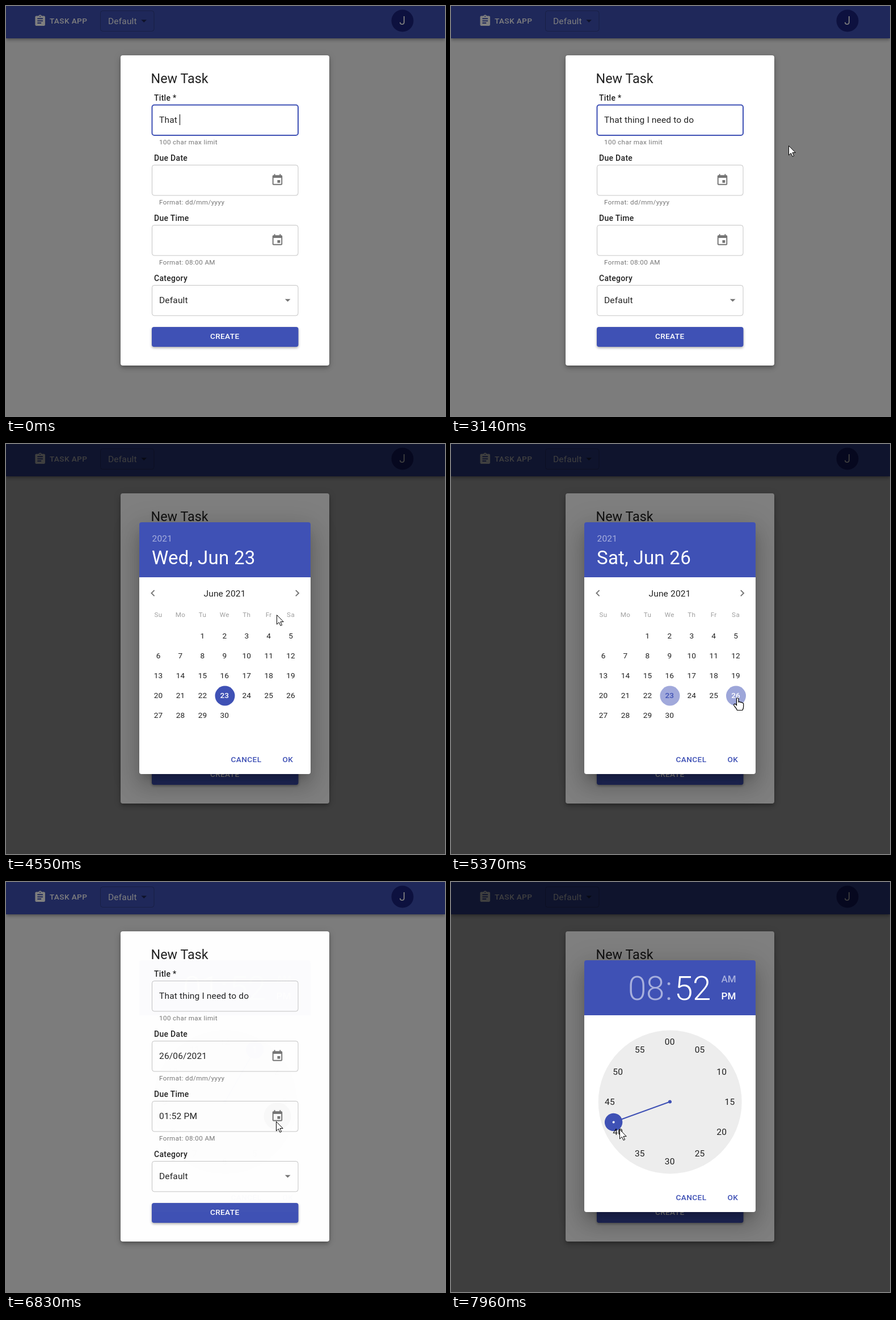
Animation of 774 by 723 pixels, one loop 8000 ms. Source, as an HTML page:

```html
<!DOCTYPE html>
<html lang="en">
<head>
<meta charset="utf-8">
<title>New Task</title>
<style>
html, body { margin: 0; width: 100%; height: 100%; overflow: hidden; background: #fafafa; }
#stage { position: relative; width: 774px; height: 723px; overflow: hidden; }
#stage div, svg { position: absolute; }
svg, .shade, #picker { left: 0; top: 0; width: 774px; height: 723px; }
text { font-family: Roboto, sans-serif; white-space: pre; fill: #000; fill-opacity: .87; }
.bar { left: 0; top: 0; width: 774px; height: 57px; background: #3f51b5;
  box-shadow: 0 2px 4px -1px #0003, 0 4px 5px #00000024, 0 1px 10px #0000001f; }
.shade { background: #000; opacity: .5; }
.paper { left: 202px; top: 87px; width: 368px; height: 546.5px; border-radius: 4px; background: #fff;
  box-shadow: 0 3px 5px -1px #0003, 0 5px 8px #00000024, 0 1px 14px #0000001f; }
.card { left: 235px; top: 138px; width: 302px; height: 444px; border-radius: 4px;
  background: linear-gradient(#3f51b5 97px, #fff 0);
  box-shadow: 0 11px 15px -7px #0003, 0 24px 38px 3px #00000024, 0 9px 46px 8px #0000001f; }
.white { fill: #fff; fill-opacity: 1; }
.faded { fill: #fff; fill-opacity: .54; }
.blue { fill: #3f51b5; fill-opacity: 1; }
.soft { fill-opacity: .54; }
.pale { fill-opacity: .38; }
.mid { text-anchor: middle; }
.medium { font-weight: 500; }
.light { font-weight: 300; }
.field { fill: none; stroke: #000; stroke-opacity: .23; }
.field.hover { stroke-opacity: .87; }
.field.focus { stroke: #3f51b5; stroke-opacity: 1; stroke-width: 2; }
</style>
</head>
<body>
<div id="stage">
  <div class="bar"></div>
  <svg id="page"></svg>
  <div class="shade"></div>
  <div class="paper"></div>
  <svg id="form"></svg>
  <div class="shade" id="dim"></div>
  <div id="picker">
    <div class="card"></div>
    <svg id="calendar"></svg>
    <svg id="clock"></svg>
    <svg id="actions"></svg>
  </div>
  <svg id="pointer">
    <path id="arrow" fill="#fff" stroke="#000" d="M0 0V16.5l3.9-3.6 2.6 6 2.6-1.1-2.6-5.8h5.2z"/>
    <path id="hand" fill="#fff" stroke="#000" stroke-width="1.2"
      d="M-1.5 1Q.3-1.5 2 1V7q2-1 3.4.5 2-.6 3 1 2.3-.2 2.3 2V15q0 3.5-2 6.500H-.5q-1-3-4.700-7-2.300-3 0-4 1.700-.4 3.700 2z"/>
  </svg>
</div>
<script>
const $ = id => document.getElementById(id);
const K = 0.973; // page zoom
const text = (x, y, str, size, cls = '', ls = .15, id = '') =>
  `<text id="${id}" x="${x}" y="${y}" class="${cls}" style="font-size:${size * K}px;letter-spacing:${ls * K}px">${str}</text>`;
const icon = (x, y, d, cls = 'soft') =>
  `<path class="${cls}" transform="translate(${x} ${y}) scale(${K})" d="${d}"/>`;
const field = (y, id) => `<rect class="field" id="${id}" x="257.5" y="${y}.5" width="257.5" height="53.5" rx="4"/>`;
const circle = (x, y, r, rest) => `<circle cx="${x}" cy="${y}" r="${r}" ${rest}/>`;

const ARROW = 'M7 10l5 5 5-5z';
const EVENT = 'M17 12h-5v5h5v-5zM16 1v2H8V1H6v2H5c-1.100 0-2 .9-2 2v14c0 1.100.9 2 2 2h14c1.100 0 2-.9 2-2V5c0-1.100-.9-2-2-2h-1V1h-2zm3 18H5V8h14v11z';
const CLIPBOARD = 'M19 3h-4.180C14.400 1.840 13.300 1 12 1s-2.400.84-2.820 2H5c-1.100 0-2 .9-2 2v14c0 1.100.9 2 2 2h14c1.100 0 2-.9 2-2V5c0-1.100-.9-2-2-2zm-7 0c.55 0 1 .45 1 1s-.45 1-1 1-1-.45-1-1 .45-1 1-1zm2 14H7v-2h7v2zm3-4H7v-2h10v2zm0-4H7V7h10v2z';

$('page').innerHTML =
  icon(48.5, 14.5, CLIPBOARD, 'white') +
  text(77, 30.5, 'TASK APP', 14, 'white medium', .4) +
  '<rect class="field" x="166.500" y="8.500" width="94.500" height="36" rx="4"/>' +
  text(180, 32, 'Default', 16, 'white') +
  icon(231.5, 14.5, ARROW) +
  circle(699, 26, 19.5, 'fill="#1a237e"') +
  text(699, 33, 'J', 20, 'white mid');

const label = (y, str) => text(261, y, str, 14.4, 'medium', .3);
const hint = (y, str) => text(270, y, str, 12, 'soft', .4);
$('form').innerHTML =
  text(255.5, 136, 'New Task', 24, '', 0) +
  label(167, 'Title *') + field(174, 'titleBox') + text(270, 206, '', 16, '', .15, 'title') +
  '<rect id="caret" y="191" width="1" height="19"/>' + hint(244, '100 char max limit') +
  label(273, 'Due Date') + field(280, 'dateBox') + text(270, 312, '', 16, '', .15, 'date') +
  hint(350, 'Format: dd/mm/yyyy') +
  label(379, 'Due Time') + field(386, 'timeBox') + text(270, 418, '', 16, '', .15, 'time') +
  hint(456, 'Format: 08:00 AM') +
  circle(478.5, 307, 24, 'id="dateRipple"') + circle(478.5, 413, 24, 'id="timeRipple"') +
  icon(466.8, 295.3, EVENT) + icon(466.8, 401.3, EVENT) +
  label(485, 'Category') + field(492, 'categoryBox') + text(270, 524, 'Default', 16) +
  icon(485, 507, ARROW) +
  '<rect class="blue" x="257" y="566" width="258.500" height="35" rx="4" style="filter:drop-shadow(0 2px 2px #0005)"/>' +
  text(385.7, 587, 'CREATE', 14, 'white medium mid', .4);

// Calendar: June 2021 starts on a Tuesday
const colX = i => 268.6 + 38.92 * i;
const days = Array.from({ length: 30 }, (_, i) => {
  const n = i + 2;
  return text(colX(n % 7), 343.3 + 35 * Math.floor(n / 7), i + 1, 14, 'mid', .15, 'day' + (i + 1));
});
$('calendar').innerHTML =
  text(257.5, 172, '2021', 16, 'faded') +
  text(257, 212, '', 34, 'white', .25, 'heading') +
  icon(247.3, 251.3, 'M15.410 16.590L10.830 12l4.580-4.590L14 6l-6 6 6 6z') +
  icon(501.8, 251.3, 'M8.590 16.590L13.170 12 8.590 7.410 10 6l6 6-6 6z') +
  text(385.5, 268.5, 'June 2021', 16, 'mid') +
  'Su Mo Tu We Th Fr Sa'.split(' ').map((d, i) => text(colX(i), 305, d, 12, 'mid pale', .4)).join('') +
  circle(386, 444, 17.5, 'class="blue" id="dot23"') +
  circle(502.5, 444, 17.5, 'class="blue" id="dot26"') + days.join('');

const CX = 386, CY = 387.5, R = 105.7;
const numbers = Array.from({ length: 12 }, (_, i) => {
  const a = i * Math.PI / 6;
  return text(CX - .3 + R * Math.sin(a), CY + 5.2 - R * Math.cos(a), '', 16, 'mid', .15, 'num' + i);
});
$('clock').innerHTML =
  text(344, 208, '', 60, 'mid light', -.5, 'hour') +
  text(384, 208, ':', 60, 'faded mid light', -.5) +
  text(426, 208, '52', 60, 'mid light', -.5, 'minute') +
  text(476.5, 177, 'AM', 17.5, 'faded medium', 0) +
  text(476.5, 207, 'PM', 17.5, 'white medium', 0) +
  circle(386.2, 388, 126.5, 'fill="#ededed"') +
  `<g id="clockHand" class="blue">
    <path d="M${CX} ${CY}v${-R}" stroke="#3f51b5" stroke-width="2"/>` +
  circle(CX, CY - R, 15.7, '') + circle(CX, CY, 3, '') + circle(CX, CY - R, 2, 'id="thumb" fill="#fff"') +
  '</g>' + numbers.join('');

$('actions').innerHTML =
  circle(498, 554, 18, 'class="blue" id="okRipple"') +
  text(396.5, 561, 'CANCEL', 14, 'blue medium', .4) +
  text(487.5, 561, 'OK', 14, 'blue medium', .4);

const clamp = v => Math.max(0, Math.min(1, v));
const between = (t, a, b) => t >= a && t < b;
const show = (id, o) => $(id).style.opacity = +o;
const write = (id, str) => { if ($(id).textContent !== str) $(id).textContent = str; };

// cubic-bezier(.4, 0, .2, 1)
function ease(x) {
  x = clamp(x);
  let lo = 0, hi = 1, s;
  for (let i = 0; i < 20; i++) {
    s = (lo + hi) / 2;
    if (1.2 * s * (1 - s) ** 2 + .6 * s * s * (1 - s) + s ** 3 < x) lo = s; else hi = s;
  }
  return 3 * s * s * (1 - s) + s ** 3;
}
const ripple = (t, start, peak) => peak * clamp((t - start) / 200) * (1 - clamp((t - start - 250) / 400));

// Keystrokes come in bursts: first time, last time, count
const keys = [[100, 170, 2], [330, 950, 8], [1330, 1330, 1], [1560, 1900, 5], [2100, 2400, 4]]
  .flatMap(([a, b, n]) => Array.from({ length: n }, (_, i) => a + (b - a) * i / Math.max(1, n - 1)));
const TITLE = 'That thing I need to do ';

const path = [
  [3140, 595.5, 246.5], [3750, 480, 303], [3900, 477.5, 301.5], [4780, 477.5, 301.5],
  [5210, 505, 448], [5390, 505, 448], [5600, 501, 541], [5750, 497, 548], [6046, 497, 548],
  [6130, 492, 528], [6400, 492, 433], [6610, 476.5, 420], [6770, 476.5, 420],
  [6810, 476.5, 422.5], [7050, 476.5, 422.5], [7780, 297.5, 436.5], [8000, 297.5, 436.5]
];
function pointerAt(t) {
  const i = Math.max(1, path.findIndex(p => p[0] > t));
  const [a, b] = [path[i - 1], path[i]];
  const u = clamp((t - a[0]) / (b[0] - a[0])), s = u * u * (3 - 2 * u);
  return [a[1] + (b[1] - a[1]) * s, a[2] + (b[2] - a[2]) * s];
}

const BLUR = 3850, PICK = 5318, ACCEPT = 6046, HOUR = 7830, MINUTES = 7900;

function draw(t) {
  // Form
  const n = keys.filter(k => k <= t).length;
  write('title', TITLE.slice(0, n === keys.length ? -1 : 5 + n));
  $('caret').setAttribute('x', Math.round(270 + $('title').getComputedTextLength()));
  show('caret', t < 2810 || between(t, 3340, BLUR));
  $('titleBox').classList.toggle('focus', t < BLUR);
  $('dateBox').classList.toggle('hover', between(t, 3530, 4242));
  write('date', t < ACCEPT ? '' : '26/06/2021');
  write('time', t < ACCEPT ? '' : '01:52 PM');
  show('dateRipple', ripple(t, BLUR, .1) + .04 * between(t, 3640, 4242));
  show('timeRipple', ripple(t, 6770, .06));

  // Picker fade
  const fade = ease((t - 4242) / 225) - ease((t - ACCEPT) / 195) + ease((t - 6819) / 225);
  show('dim', fade / 2);
  show('picker', fade);
  const clock = t > 6500;
  show('calendar', !clock);
  show('clock', clock);

  // Calendar
  const picked = t >= PICK, p = ease((t - PICK) / 150);
  write('heading', picked ? 'Sat, Jun 26' : 'Wed, Jun 23');
  show('dot23', 1 - p);
  show('dot26', p);
  $('day23').setAttribute('class', 'mid medium ' + (picked ? 'blue' : 'white'));
  $('day26').setAttribute('class', 'mid ' + (picked ? 'white medium' : ''));
  show('okRipple', ripple(t, 5850, .16));

  // Clock
  const minutes = t >= MINUTES, hour = t < HOUR ? 1 : 8;
  write('hour', '0' + hour);
  $('hour').setAttribute('class', 'mid light ' + (minutes ? 'faded' : 'white'));
  $('minute').setAttribute('class', 'mid light ' + (minutes ? 'white' : 'faded'));
  const angle = 30 * hour + 72 * ease((t - MINUTES) / 300);
  $('clockHand').setAttribute('transform', `rotate(${angle} ${CX} ${CY})`);
  show('thumb', minutes);
  for (let i = 0; i < 12; i++) {
    write('num' + i, minutes ? String(i * 5).padStart(2, '0') : String(i || 12));
    $('num' + i).setAttribute('class', 'mid ' + (!minutes && i === hour ? 'white' : ''));
  }

  // Pointer
  const [x, y] = pointerAt(t);
  const isHand = between(t, 3640, 4242) || between(t, 4880, 5450) || between(t, 5600, 6060);
  $('pointer').style.transform = `translate(${x}px,${y}px)`;
  $('pointer').style.overflow = 'visible';
  show('arrow', t >= 3140 && !isHand);
  show('hand', isHand);
}

function tick() {
  draw(performance.now() % 8000);
  requestAnimationFrame(tick);
}
tick();
</script>
</body>
</html>
```
